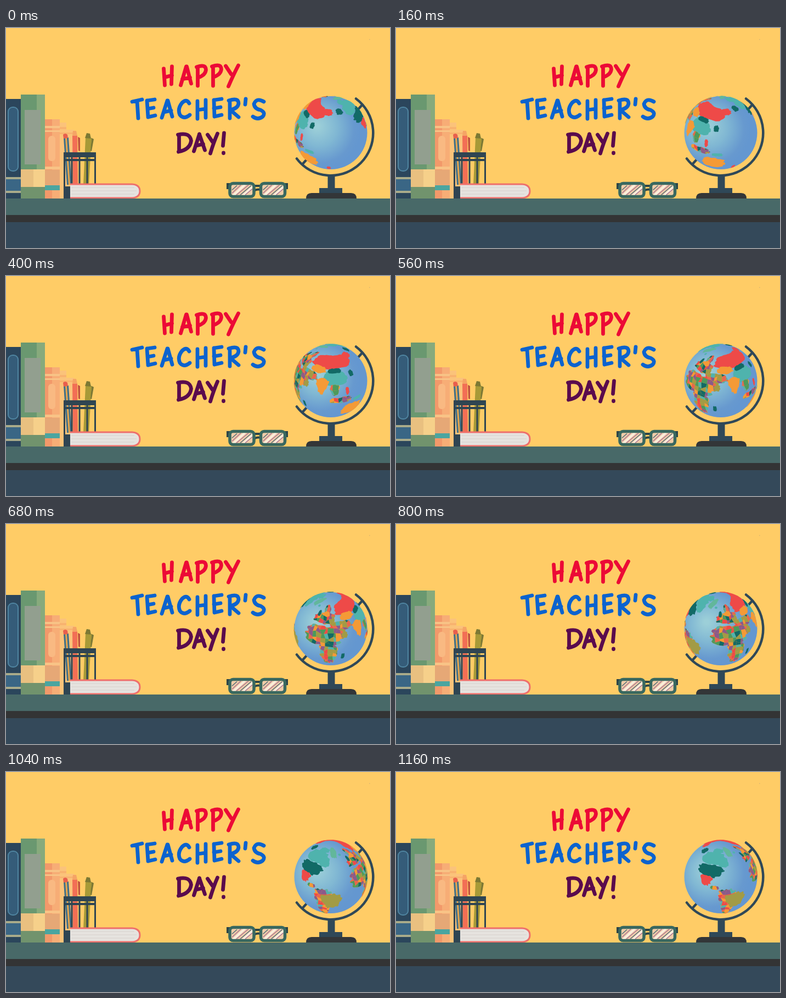
An HTML page with a canvas for the animation above (1.2 s loop, 700x400 px).

```html
<!DOCTYPE html>
<html lang="en">
<head>
<meta charset="utf-8">
<title>Happy Teacher's Day!</title>
<style>
  html, body { margin: 0; width: 100%; height: 100%; overflow: hidden; background: #ffcc66; }
  svg, canvas { position: absolute; left: 0; top: 0; width: 700px; height: 400px; }
  .ink { fill: none; stroke-width: 6.8; stroke-linecap: round; stroke-linejoin: round; }
  .dark { fill: none; stroke: #2f4858; stroke-width: 4.5; }
</style>
</head>
<body>
<svg viewBox="0 0 700 400">
  <defs>
    <g id="lens">
      <rect width="44" height="24" rx="6" fill="#f0cda8"/>
      <g fill="none">
        <path stroke="#fbeedd" stroke-width="4" d="M6 22L28 2M24 22L42 6"/>
        <path stroke="#a76f91" stroke-width="1.4" d="M4 18L20 3M12 21L34 3M28 21L41 10"/>
        <path stroke="#4d6878" stroke-width="1.4" d="M4 12L13 4M19 21L39 4"/>
      </g>
      <rect width="44" height="24" rx="6" fill="none" stroke="#39685f" stroke-width="5.5"/>
    </g>
  </defs>
  <rect width="700" height="400" fill="#ffcc66"/>
  <rect x="662" y="20" width="1.5" height="1.5" fill="#d9b574"/>

  <!-- lettering -->
  <g role="img" aria-label="Happy Teacher's Day!">
    <path class="ink" stroke="#ec0a36" transform="translate(-1.500 0)" d="M289 74L291 104M304 70L303 102M290 90L304 86
      M330 70L320 104M331 70L339 101M323 93L337 90
      M351 71L351 105M349 71Q366 65 366 76Q365 86 352 90
      M379 70L379 105M377 70Q394 64 394 75Q393 85 380 89
      M402 69L412 84M425 68Q416 85 407 106"/>
    <path class="ink" stroke="#0b63cf" d="M230 134L248 130M239 133L241 164
      M257 132L259 162M257 132L271 130M258 147L269 145M259 162L272 159
      M294 132L284 163M295 132L303 161M288 153L301 150
      M334 137Q329 128 321 136Q312 147 317 158Q324 167 335 158
      M349 133L349 165M364 131L364 163M349 149L364 147
      M379 131L380 161M379 131L393 129M379 146L391 144M380 161L393 158
      M408 132L408 164M406 132Q424 126 424 137Q423 146 409 149L424 162
      M437 129L436 139
      M470 134Q457 126 452 138Q453 147 464 149Q474 154 468 161Q459 168 450 161"/>
    <path class="ink" stroke="#5a0b4d" transform="translate(-.500 0)" d="M316 194L316 224M314 194Q336 189 338 205Q336 221 315 225
      M353 193L343 224M353 193L363 222M347 214L360 211
      M368 194L377 207M386 192Q379 208 373 228M398 191L396 214M397 227L397 227.500"/>
  </g>

  <!-- standing books -->
  <g>
    <path fill="#fbc37a" d="M98 172h12v13h14v125h-26z"/>
    <path fill="#f8b36f" d="M98 180h12v4h-12zM98 190h26v3h-26z"/>
    <rect x="70" y="166" width="28" height="144" fill="#f2996a"/>
    <path fill="#f7ad76" d="M84 166h14v144h-14z"/>
    <path fill="#f8c386" d="M71 178h27v4h-27zM71 186h27v3h-27zM71 252h27v5h-27z"/>
    <rect x="77" y="196" width="13" height="46" rx="6" fill="#f9b982"/>
    <path fill="#e6a876" d="M71 258h27v28h-27z"/>
    <path fill="#4ba5a0" d="M71 286h27v9h-27z"/>

    <rect y="129" width="27" height="181" fill="#2b465c"/>
    <rect x="4" y="144" width="18" height="116" rx="8" fill="#355c79" stroke="#4f84a0" stroke-width="2"/>
    <path fill="#a9ab8a" d="M0 271h27v4h-27zM0 296h27v4h-27z"/>
    <path fill="#3a6685" d="M0 275h27v21h-27z"/>

    <rect x="27" y="121" width="44" height="189" fill="#6a9870"/>
    <path fill="#87aa7c" d="M56 121h15v189h-15z"/>
    <rect x="34" y="149" width="29" height="99" fill="#929f8f"/>
    <path fill="#e9c080" d="M27 257h44v32h-44z"/>
    <path fill="#f6d08a" d="M50 257h21v32h-21z"/>
    <path fill="#71936d" d="M27 289h44v21h-44z"/>
  </g>

  <!-- pens and cup -->
  <g>
    <path fill="#3f7088" d="M105 200l9-1 6 86h-9z"/>
    <path fill="#e6a64e" d="M108 200h3l6 85h-3z"/>
    <path fill="#e85f4d" d="M104 194q4-4 8 0l1 6-8 1z"/>
    <path fill="#f26f55" d="M121 196l9-1 1 90h-9z"/>
    <path fill="#f5a465" d="M122 187h6l2 9h-9z"/>
    <path fill="#c3523f" d="M131 198l4 2v24l-3-1z"/>
    <path fill="#a79a37" d="M145 199l11 1-5 85h-10z"/>
    <path fill="#7c7934" d="M147 191l6 1 2 9-11-1zM156 200l4 2-4 22-2-1z"/>
    <path fill="#2f4552" d="M105 226h59v9h-59zM105 238h59v4h-59zM105 288h14v22h-14z"/>
    <path fill="none" stroke="#2f4552" stroke-width="3" d="M106.500 226v84M120 226v60M134 226v60M148 226v60M162.500 226v60"/>
  </g>

  <!-- lying book -->
  <path d="M117 284H230Q244 285 244 296.500T230 309H117" fill="#e6e3df" stroke="#ef6f6b" stroke-width="3"/>
  <path d="M119 290H234M119 296H238M119 302H234" fill="none" stroke="#d6d1cd"/>

  <!-- glasses -->
  <path fill="none" stroke="#2e4547" stroke-width="4" d="M452 287H468M452 296Q460 291 468 296"/>
  <path fill="#2e4547" d="M402 282h6v11h-6zM508 282h6v11h-6z"/>
  <use href="#lens" x="408" y="282.500"/>
  <use href="#lens" x="464.500" y="282.500"/>

  <!-- globe stand -->
  <path fill="#2f4858" d="M586.500 266h13v25h13.500v10h-42v-10h15.500z"/>
  <path fill="#333638" d="M547 310q0-10 10-10h72q10 0 10 10z"/>
  <path class="dark" stroke-linecap="round" d="M638 128.500A77.500 77.500 0 1 1 530 237.500"/>
  <path class="dark" d="M650 139L640 150M550 237L540 248"/>

  <!-- desk -->
  <rect y="310" width="700" height="30" fill="#486968"/>
  <rect y="340" width="700" height="13" fill="#333435"/>
  <rect y="353" width="700" height="47" fill="#34495a"/>
</svg>
<canvas id="globe" width="700" height="400"></canvas>

<script>
const ctx = document.getElementById('globe').getContext('2d');
const CX = 592, CY = 190.5, R = 66.5, RAD = Math.PI / 180;
const TILT = 31 * RAD, LOOP = 1200, STEP = 40, CELL = 7;
const RED = '#ee4a48', ORANGE = '#f49a36', TEAL = '#4fb3ad', DEEP = '#126a66', OLIVE = '#a29b45', GREEN = '#62b79b';
const MIX = [RED, ORANGE, TEAL, DEEP, OLIVE, '#e8664e', '#8b5a8a', '#4c9a5c'];

const lands = [];
const hash = (a, b) => {
  const s = Math.sin(a * 127.1 + b * 311.7 + 4) * 43758.5453;
  return s - Math.floor(s);
};

// Rounded block with a ragged coast; taper narrows it to the south
function land(color, lon, lat, w, h, taper = 0) {
  const pts = Array.from({ length: 48 }, (_, i) => {
    const a = i / 48 * 2 * Math.PI, c = Math.cos(a), s = Math.sin(a);
    const box = (Math.abs(c) ** 3 + Math.abs(s) ** 3) ** (-1 / 3);
    const r = box * (.86 + .24 * hash(Math.floor(i / 2), lon));
    return [lon + w * r * c * (1 + taper * s), lat + h * r * s];
  });
  const part = { color, pts, cells: [] };
  lands.push(part);
  return part;
}

// Land split into irregular, randomly coloured countries
function mosaic(lon, lat, w, h, taper) {
  const { cells } = land(ORANGE, lon, lat, w, h, taper);
  const node = (i, j) => [(i + hash(i, j) * .7) * CELL, (j + hash(j, i + 9) * .7) * CELL];
  const first = v => Math.floor(v / CELL) - 2, last = v => v / CELL + 2;
  for (let i = first(lon - w); i < last(lon + w); i++)
    for (let j = first(lat - h); j < last(lat + h); j++)
      cells.push({
        color: MIX[Math.floor(hash(i + 3, j + 17) * MIX.length)],
        pts: [node(i, j), node(i + 1, j), node(i + 1, j + 1), node(i, j + 1)]
      });
}

// Asia and Oceania
land(RED, 98, 61, 66, 13);
land(RED, 164, 64, 20, 6);
mosaic(48, 34, 22, 7);
land(OLIVE, 46, 22, 9, 8, -.3);
land(ORANGE, 67, 47, 18, 6);
land(TEAL, 103, 34, 24, 11);
land(DEEP, 104, 46, 15, 4);
land(ORANGE, 80, 21, 9, 13, .7);
mosaic(102, 16, 7, 9, .4);
mosaic(112, -2, 17, 5);
land(TEAL, 141, -6, 9, 3);
land(RED, 123, 12, 3, 6);
land(DEEP, 138, 37, 5, 5);
land(ORANGE, 133, -25, 20, 12);
land(RED, 173, -41, 4, 6);

// Africa and Europe
mosaic(15, 19, 32, 16);
mosaic(24, -14, 14, 21, .3);
land(DEEP, 47, -19, 3, 6);
mosaic(13, 47, 24, 9);
mosaic(18, 63, 10, 8);
land(DEEP, -3, 54, 4, 5);
land(TEAL, -19, 65, 5, 2);

// Americas
land(GREEN, -41, 72, 15, 12, .4);
land(TEAL, -98, 60, 36, 12);
land(TEAL, -69, 54, 13, 9);
land(TEAL, -90, 75, 30, 5);
land(DEEP, -152, 64, 12, 6);
land(DEEP, -97, 39, 27, 10, .2);
land(RED, -102, 23, 10, 8, .4);
mosaic(-86, 13, 7, 3);
mosaic(-66, -2, 14, 13);
mosaic(-66, -33, 9, 21, .5);
land(OLIVE, -52, -11, 15, 14, .3);

// Orthographic view; hidden points slide to the rim
function project(lon, lat, center) {
  const d = (lon - center) * RAD, p = lat * RAD;
  let x = Math.cos(p) * Math.sin(d);
  let y = Math.sin(p) * Math.cos(TILT) - Math.cos(p) * Math.sin(TILT) * Math.cos(d);
  const z = Math.sin(p) * Math.sin(TILT) + Math.cos(p) * Math.cos(TILT) * Math.cos(d);
  if (z < 0) {
    const len = Math.hypot(x, y) || 1;
    x /= len;
    y /= len;
  }
  return [CX + x * R * 1.012, CY - y * R * 1.012, z > 0];
}

function outline(pts, center) {
  const path = new Path2D();
  let seen = false;
  for (const [lon, lat] of pts) {
    const [x, y, front] = project(lon, lat, center);
    path.lineTo(x, y);
    seen = seen || front;
  }
  path.closePath();
  return seen && path;
}

function paint({ color, pts }, center) {
  const shape = outline(pts, center);
  if (!shape) return;
  ctx.fillStyle = color;
  ctx.fill(shape);
  return shape;
}

const sea = ctx.createRadialGradient(566, 178, 4, 574, 184, 72);
sea.addColorStop(0, '#9ccfd8');
sea.addColorStop(.45, '#80b7d3');
sea.addColorStop(.85, '#6799cf');
sea.addColorStop(1, '#6497d0');

// Facing longitude: a steady turn, a little quicker midway
const facing = t => 177 - .217 * t + 6 * Math.sin(t / LOOP * 2 * Math.PI);

function draw(t) {
  const center = facing(t);
  ctx.clearRect(510, 110, 165, 165);
  ctx.fillStyle = sea;
  ctx.beginPath();
  ctx.arc(CX, CY, R, 0, 2 * Math.PI);
  ctx.fill();
  for (const part of lands) {
    const shape = paint(part, center);
    if (!shape || !part.cells.length) continue;
    ctx.save();
    ctx.clip(shape);
    for (const cell of part.cells) paint(cell, center);
    ctx.restore();
  }
}

const start = performance.now();
function tick() {
  const t = (performance.now() - start) % LOOP;
  draw(Math.floor(t / STEP) * STEP);
  requestAnimationFrame(tick);
}
tick();
</script>
</body>
</html>
```
